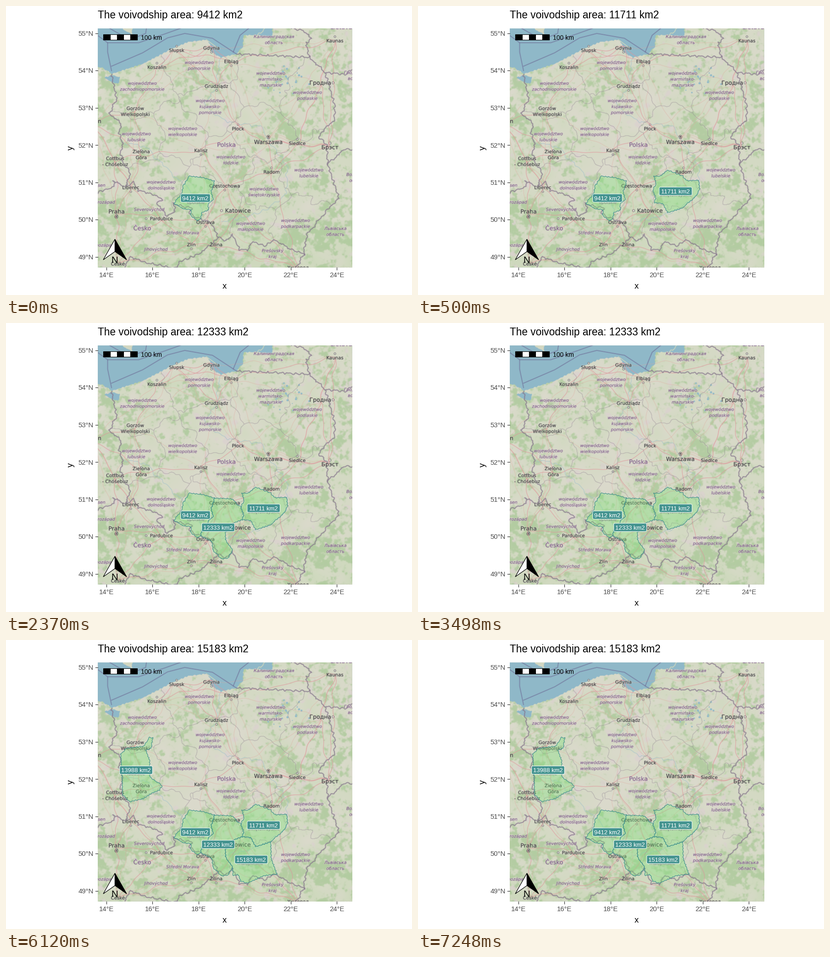
A matplotlib script for the animation above (8000 ms loop, 885 by 632 pixels).

```python
import matplotlib.pyplot as plt
import numpy as np
from matplotlib.animation import FuncAnimation
from matplotlib.patches import Circle, FancyBboxPatch, Polygon, Rectangle
from matplotlib.patheffects import withStroke

W, H, DPI = 885, 632, 64
LEFT, RIGHT, TOP, BOTTOM = 200, 755, 49, 572
PT = 72 / DPI
LOOP, INTERVAL = 8000, 40
REVEALS = (0, 500, 2370, 4250, 6120)
DARK, PURPLE, TEAL = "#38373b", "#7d5a89", "#43938f"

rng = np.random.default_rng(7)
fig = plt.figure(figsize=(W / DPI, H / DPI), dpi=DPI, facecolor="white")


def pixel_axes(x0, x1, y0, y1):
    ax = fig.add_axes([x0 / W, 1 - y1 / H, (x1 - x0) / W, (y1 - y0) / H])
    ax.set(xlim=(x0, x1), ylim=(y1, y0))
    ax.axis("off")
    return ax


def geo(lonlat):
    lon, lat = np.transpose(lonlat)
    return np.column_stack([219 + 50.23 * (lon - 14), 60 + 81.45 * (55 - lat)])


def wiggle(pts, amp, freq):
    """Polyline with position-based jitter, so shared edges coincide."""
    pts = np.asarray(pts, float)
    parts = []
    for a, b in zip(pts[:-1], pts[1:]):
        n = max(2, int(np.hypot(*(b - a)) / 1.5))
        parts.append(a + (b - a) * np.linspace(0, 1, n)[:, None])
    x, y = np.vstack(parts).T
    dx = np.sin(freq * (1.1 * y + 0.5 * x)) + 0.6 * np.sin(freq * (2.3 * y - x))
    dy = np.sin(freq * (1.2 * x - 0.4 * y)) + 0.6 * np.sin(freq * (2.1 * x + y))
    return np.column_stack([x + amp * dx, y + amp * dy])


# ---- terrain raster ----
yy, xx = np.mgrid[TOP:BOTTOM, LEFT:RIGHT]


def noise(sigma):
    fy, fx = np.fft.fftfreq(xx.shape[0])[:, None], np.fft.fftfreq(xx.shape[1])
    kernel = np.exp(-2 * (np.pi * sigma) ** 2 * (fx ** 2 + fy ** 2))
    field = np.fft.ifft2(np.fft.fft2(rng.normal(size=xx.shape)) * kernel).real
    return field / field.std()


def mix(a, b, t):
    return a + (np.array(b) - a) * t[..., None]


def terrain():
    south = 1 / (1 + np.exp((430 - yy) / 25))
    rim = np.hypot(xx - 490, yy - 290) / 250
    woods = (0.6 * rim + 0.4 * south - 1.3
             + 0.4 * noise(20) + 0.5 * noise(7) + 0.6 * noise(3) + 0.3 * noise(1.4))
    land = np.full(xx.shape + (3,), (219.0, 218.0, 204.0))
    land = mix(land, (207, 217, 190), np.clip(0.35 + 0.2 * noise(12) + 0.4 * south, 0, 1))
    land = mix(land, (219, 210, 207), np.clip(noise(5) - 1.1, 0, 0.8))
    land = mix(land, (171, 201, 153), 0.8 / (1 + np.exp(-4 * woods)))
    return land.clip(0, 255).astype(np.uint8)


# ---- geography (longitude, latitude) ----
COAST = [(14.25, 53.92), (15.57, 54.18), (16.4, 54.44), (16.85, 54.59), (17.55, 54.77),
         (18.34, 54.83), (18.48, 54.72), (18.56, 54.5), (18.95, 54.35), (19.65, 54.45)]
AMBER = [(19.92, 54.65), (19.95, 54.95), (20.5, 54.96), (21.2, 54.92), (21.2, 55.3)]
ODRA = [(14.22, 53.92), (14.27, 53.7), (14.44, 53.26), (14.13, 52.85), (14.64, 52.58),
        (14.55, 52.35), (14.72, 52.0), (14.6, 51.8), (14.72, 51.53), (15.03, 51.25),
        (14.82, 50.87)]
SUDETES = [(14.82, 50.87), (15.17, 51.02), (15.4, 50.78), (16.1, 50.66), (16.4, 50.55),
           (16.2, 50.42), (16.65, 50.1), (17.0, 50.22), (16.9, 50.43), (17.7, 50.3),
           (17.6, 50.16), (18.0, 50.03), (18.55, 49.92), (18.85, 49.52)]
CARPATHIANS = [(18.85, 49.52), (19.2, 49.42), (19.45, 49.6), (19.8, 49.2), (20.08, 49.18),
               (20.35, 49.4), (20.9, 49.3), (21.3, 49.45), (22.0, 49.2), (22.56, 49.08)]
BUG = [(22.56, 49.08), (22.7, 49.6), (23.5, 50.2), (24.1, 50.6), (23.95, 50.85),
       (23.6, 51.5), (23.55, 52.0), (23.2, 52.25), (23.9, 52.7), (23.9, 53.1),
       (23.5, 53.95), (22.8, 54.36)]
NORTH = [(22.8, 54.36), (19.65, 54.45)]
FOREIGN = [
    [(22.8, 54.36), (22.65, 54.75), (22.9, 54.85), (22.6, 55.06), (22.0, 55.15)],
    [(23.5, 53.95), (24.4, 53.9), (24.9, 54.15)],
    [(23.6, 51.5), (24.3, 51.88), (24.9, 51.9)],
    [(18.85, 49.52), (18.1, 49.1), (17.2, 48.87), (16.9, 48.65)],
    [(14.82, 50.87), (14.3, 51.05), (14.35, 50.88), (13.5, 50.7)],
    [(22.56, 49.08), (22.2, 48.65)],
    [(14.7, 48.6), (15.0, 49.0), (15.7, 48.85), (16.9, 48.7)]]
SEA_LIMITS = [
    [(14.22, 54.0), (14.05, 54.5), (14.05, 54.75), (13.5, 55.0)],
    [(14.22, 54.12), (15.57, 54.48), (16.65, 54.88), (17.4, 55.0), (18.6, 54.87),
     (19.66, 54.44)],
    [(14.05, 54.75), (15.4, 54.75), (16.5, 54.98), (17.5, 55.2)],
    [(19.5, 54.5), (19.8, 54.95), (20.3, 55.2)],
    [(14.1, 55.15), (15.0, 54.83), (15.7, 55.0), (15.75, 55.2)]]
RIVERS = [
    [(18.95, 54.35), (18.75, 53.5), (18.2, 53.1), (19.1, 52.65), (20.7, 52.5), (21, 52.2),
     (21.85, 51.4), (21.8, 50.7), (20.9, 50.25), (19.9, 50.05), (19, 49.95)],
    [(14.7, 52.07), (15.7, 51.95), (16.9, 51.2), (17.9, 50.65), (18.2, 50.1)]]

# ---- map labels (stage pixels) ----
PROVINCES = [("pomorskie", 421, 130), ("zachodniopomorskie", 297, 175.5),
             ("warmińsko-|mazurskie", 577, 160), ("podlaskie", 657, 195.5),
             ("kujawsko-|pomorskie", 445, 220), ("wielkopolskie", 385, 274.5),
             ("lubuskie", 284, 286), ("łódzkie", 490, 336.5), ("lubelskie", 660, 365),
             ("dolnośląskie", 338, 391.5), ("opolskie", 414, 423),
             ("świętokrzyskie", 562, 406.5), ("małopolskie", 533, 482),
             ("podkarpackie", 631, 475.5)]
ABROAD = [("Калининградская|область", 584, 73.5), ("Львівська|область", 718, 493),
          ("Severovýchod", 312, 445), ("Střední Morava", 385, 496),
          ("Jihovýchod", 327, 532), ("Prešovský|kraj", 581, 541.5),
          ("Severozápad", 207, 429), ("Jihozápad", 213, 523), ("Sachsen", 197, 392),
          ("Гродзенская|вобласць", 768, 152), ("Волинська|область", 768, 375)]
# The last field tells on which side of the name the town dot sits.
TOWNS = [("Słupsk", 372, 97, "up"), ("Gdynia", 448, 92, "down"), ("Elbląg", 491, 121.5, "down"),
         ("Koszalin", 329, 134, "up"), ("Grudziądz", 459, 175.5, "down"),
         ("Kaunas", 717, 76, "up"), ("Gorzów|Wielkopolski", 282, 230.5, ""),
         ("Płock", 506, 268.5, "up"), ("Siedlce", 635, 300.5, "up"),
         ("Zielona|Góra", 295, 325, "up"), ("Kalisz", 425, 316, "down"),
         ("Cottbus|- Chóśebuz", 238, 340, "up"), ("Radom", 579, 363, "up"),
         ("Częstochowa", 477, 393.5, "down"), ("Liberec", 272, 397, "down"),
         ("Pardubice", 339, 465, "left"), ("Ostrava", 435, 473, "down"),
         ("Zlín", 404, 522, "down"), ("Žilina", 458, 522, "down"),
         ("České", 244, 564, ""), ("Ужгород", 637, 572, "")]
CITIES = [("Warszawa", 572, 297.5, "up"), ("Katowice", 505.5, 447.5, "left"),
          ("Praha", 241, 449.5, "down"), ("Гродна", 685, 168, "right"),
          ("Брэст", 706, 309, "up"), ("Berlin", 190, 252, "")]
COUNTRIES = [("Polska", 480.5, 303.5), ("Česko", 297, 486), ("Lietuva", 731, 46)]

sheet = pixel_axes(LEFT, RIGHT, TOP, BOTTOM)
sheet.imshow(terrain(), extent=(LEFT, RIGHT, BOTTOM, TOP), interpolation="nearest",
             aspect="auto")


def trace(pts, color, width, alpha, amp=1.2, freq=0.4):
    sheet.plot(*wiggle(pts, amp, freq).T, color=color, lw=width * PT, alpha=alpha)


def patch(pts, color):
    sheet.add_patch(Polygon(wiggle(pts, 0.7, 0.5), color=color, lw=0))


def draw_water():
    patch(geo([(13.5, 55.4), (13.5, 54.12), (13.8, 54.08)] + COAST + AMBER), "#8fb8c8")
    patch(geo([(13.9, 53.82), (14.25, 53.88), (14.6, 53.82), (14.5, 53.65), (14.2, 53.7)]),
          "#8fb8c8")
    patch(geo([(14.68, 55.3), (14.72, 55.1), (15.1, 54.98), (15.15, 55.3)]), "#d3d7c2")
    trace(geo([(20.5, 54.96), (20.7, 55.0), (20.95, 55.2)]), "#cdd6bd", 1.6, 1)
    trace(geo([(18.34, 54.83), (18.8, 54.62)]), "#cdd6bd", 1.6, 1, 0)
    for x, y in rng.normal((607, 160), (26, 20), (34, 2)):
        sheet.add_patch(Circle((x, y), rng.uniform(0.7, 2.4), color="#93bac8", lw=0))
    for river in RIVERS:
        trace(geo(river), "#9fc0cb", 1, 0.8, 2, 0.2)


def draw_roads():
    """Join every town to its nearest neighbours."""
    spots = np.array([t[1:3] for t in TOWNS + CITIES])
    gaps = np.hypot(*(spots[:, None] - spots).transpose(2, 0, 1))
    for reach, color, width in ((7, "#e0a69c", 0.7), (4, "#e08f9b", 1.0)):
        near = np.argsort(gaps, axis=1)[:, 1:reach]
        for a, b in {tuple(sorted((a, b))) for a, row in enumerate(near) for b in row}:
            trace(spots[[a, b]], color, width, 0.65, 3, 0.06)


def draw_borders():
    outline = wiggle(geo(COAST + NORTH[::-1] + BUG[::-1] + CARPATHIANS[::-1]
                         + SUDETES[::-1] + ODRA[::-1]), 1.5, 0.35)
    country = sheet.add_patch(Polygon(outline, fc="none", ec="none"))
    # Provinces are the cells nearest to each centre, on warped ground.
    centres = [p[1:] for p in PROVINCES] + [(465, 447), (550, 285)]
    wx, wy = (v + 5 * noise(12) + 3 * noise(4) for v in (xx, yy))
    cell = np.argmin([np.hypot(wx - x, wy - y) for x, y in centres], axis=0)
    for k in range(len(centres)):
        edge = sheet.contour(xx, yy, cell == k, levels=[0.5], colors="#8f8091",
                             linewidths=0.9 * PT, alpha=0.32)
        edge.set_clip_path(country)
    for border in [ODRA, SUDETES, CARPATHIANS, BUG, NORTH] + FOREIGN:
        trace(geo(border), "#83738a", 2.1, 0.75, 1.5, 0.35)
    for limit in SEA_LIMITS:
        trace(geo(limit), "#6f7099", 1.7, 0.75, 0)


def caption(text, x, y, size=10.2, color=DARK, style="normal"):
    lines = text.split("|")
    for i, line in enumerate(lines):
        dy = (i - (len(lines) - 1) / 2) * 13 + 0.34 * size
        sheet.text(x, y + dy, line, fontsize=size * PT, color=color, style=style,
                   ha="center", va="baseline", family="DejaVu Sans", clip_on=True,
                   path_effects=[withStroke(linewidth=2 * PT,
                                            foreground=(0.91, 0.91, 0.86, 0.35))])


def town(name, x, y, side, size=10.2):
    reach = 0.31 * size * len(name) + 5
    offsets = {"up": (0, -9), "down": (0, 9), "left": (-reach, 0), "right": (reach, 0)}
    if side in offsets:
        dx, dy = offsets[side]
        sheet.add_patch(Circle((x + dx, y + dy), size / 5, fc="#e4e2da", ec="#66646a",
                               lw=0.9 * PT))
    caption(name, x, y, size)


draw_water()
draw_roads()
draw_borders()
for name, x, y in PROVINCES:
    caption("województwo|" + name, x, y, 9.4, PURPLE, "italic")
for label in ABROAD:
    caption(*label, 9.4, PURPLE, "italic")
for label in TOWNS:
    town(*label)
for label in CITIES:
    town(*label, 12.4)
for x, y in ((572, 286), (240.5, 461)):
    sheet.add_patch(Circle((x, y), 3.3, fc="#dddbd2", ec=DARK, lw=0.9 * PT))
    sheet.add_patch(Circle((x, y), 1.6, color=DARK, lw=0))
for label in COUNTRIES:
    caption(*label, 13, PURPLE)

# Bake the base map once, slightly softened, to keep every frame cheap.
fig.canvas.draw()
picture = np.array(fig.canvas.buffer_rgba())
tile = picture[TOP:BOTTOM, LEFT:RIGHT].astype(float)
for axis in (0, 1):
    tile = 0.8 * tile + 0.1 * (np.roll(tile, 1, axis) + np.roll(tile, -1, axis))
picture[TOP:BOTTOM, LEFT:RIGHT] = tile.round()
sheet.remove()
fig.figimage(picture, origin="upper", zorder=-1)

# ---- plot furniture ----
ax = pixel_axes(0, W, 0, H)


def write(x, y, text, size, color="black", ha="center", **kw):
    kw.setdefault("va", "baseline")
    return ax.text(x, y, text, fontsize=size * PT, color=color, ha=ha,
                   family="Liberation Sans", **kw)


title = write(200, 27, "", 22.6, ha="left")
write(476.5, 618, "x", 18.3)
write(141.5, 310.5, "y", 18.3, rotation=90, va="center")
for i in range(6):
    x = 219 + 100.45 * i
    ax.plot([x, x], [572, 576.6], color="#333333", lw=1.2 * PT)
    write(x, 593.3, f"{14 + 2 * i}°E", 14.9, "#4d4d4d")
for i in range(7):
    y = 548.5 - 81.5 * i
    ax.plot([195.4, 200], [y, y], color="#333333", lw=1.2 * PT)
    write(190.5, y + 5.5, f"{49 + i}°N", 14.9, "#4d4d4d", "right")

for i in range(5):
    ax.add_patch(Rectangle((212 + 14.8 * i, 62), 14.8, 12, ec="black", lw=1.1 * PT,
                           fc="white" if i % 2 else "black"))
write(293.5, 74, "100 km", 14, ha="left")
for side, fill in ((212, "white"), (263, "black")):
    ax.add_patch(Polygon([(237.5, 510), (side, 555), (237.5, 537)], fc=fill, ec="black",
                         lw=1.2 * PT, joinstyle="miter"))
write(237, 562.5, "N", 20.5)

# ---- regions (stage pixels); neighbours share their common edges ----
OPOLE_SILESIA = [(455, 383), (447, 406), (452, 424), (440, 433), (442, 446), (427, 452),
                 (424, 465)]
SILESIA_HOLY = [(512, 402), (518, 420), (515, 430)]
SILESIA_LESSER = [(515, 430), (494, 438), (478, 460), (479, 475), (494, 497)]
HOLY_LESSER = [(515, 430), (533, 432), (545, 452), (577, 441)]
REGIONS = [
    (9412, 413, 420, OPOLE_SILESIA + [
        (417, 470), (402, 457), (404, 446), (385, 443), (366, 431), (383, 410), (386, 394),
        (399, 372), (428, 375)]),
    (11711, 561.5, 405, SILESIA_HOLY + HOLY_LESSER[1:] + [
        (607, 415), (614, 400), (612, 381), (586, 382), (577, 372), (545, 359), (527, 372),
        (514, 372), (519, 388)]),
    (12333, 462.5, 447, OPOLE_SILESIA[::-1] + [(482, 384), (494, 385), (505, 398)]
     + SILESIA_HOLY + SILESIA_LESSER[1:] + [(484, 514), (470, 516), (452, 498), (449, 478)]),
    (13988, 283.5, 284.5, [
        (313, 213), (320, 214), (316, 237), (305, 241), (313, 262), (314, 300), (340, 318),
        (335, 328), (318, 335), (298, 347), (270, 354), (254, 338), (253, 300), (250, 250),
        (262, 237), (300, 232)]),
    (15183, 534.5, 480, SILESIA_LESSER[::-1] + HOLY_LESSER[1:] + [
        (578, 478), (591, 512), (560, 516), (525, 532), (512, 527), (506, 513), (495, 515)])]


def region_artists(area, cx, cy, outline):
    width = 13 * 0.556 * len(str(area)) + 35.5
    return [
        ax.add_patch(Polygon(wiggle(outline + outline[:1], 0.8, 0.75), zorder=3,
                             fc=(0.47, 0.9, 0.47, 0.33), ec="#3f8f8d", lw=1.1 * PT)),
        ax.add_patch(FancyBboxPatch((cx - width / 2, cy - 9), width, 18, fc=TEAL, ec="white",
                                    boxstyle="round,pad=0,rounding_size=2.5", lw=PT,
                                    zorder=5)),
        write(cx, cy + 4.8, f"{area} km2", 13, "white", zorder=6)]


groups = [region_artists(*region) for region in REGIONS]


def update(frame):
    shown = sum(frame >= start // INTERVAL for start in REVEALS)
    for i, group in enumerate(groups):
        for artist in group:
            artist.set_visible(i < shown)
    title.set_text(f"The voivodship area: {REGIONS[shown - 1][0]} km2")


anim = FuncAnimation(fig, update, frames=LOOP // INTERVAL, interval=INTERVAL, repeat=True,
                     repeat_delay=0, init_func=lambda: update(0))
plt.show()
```
